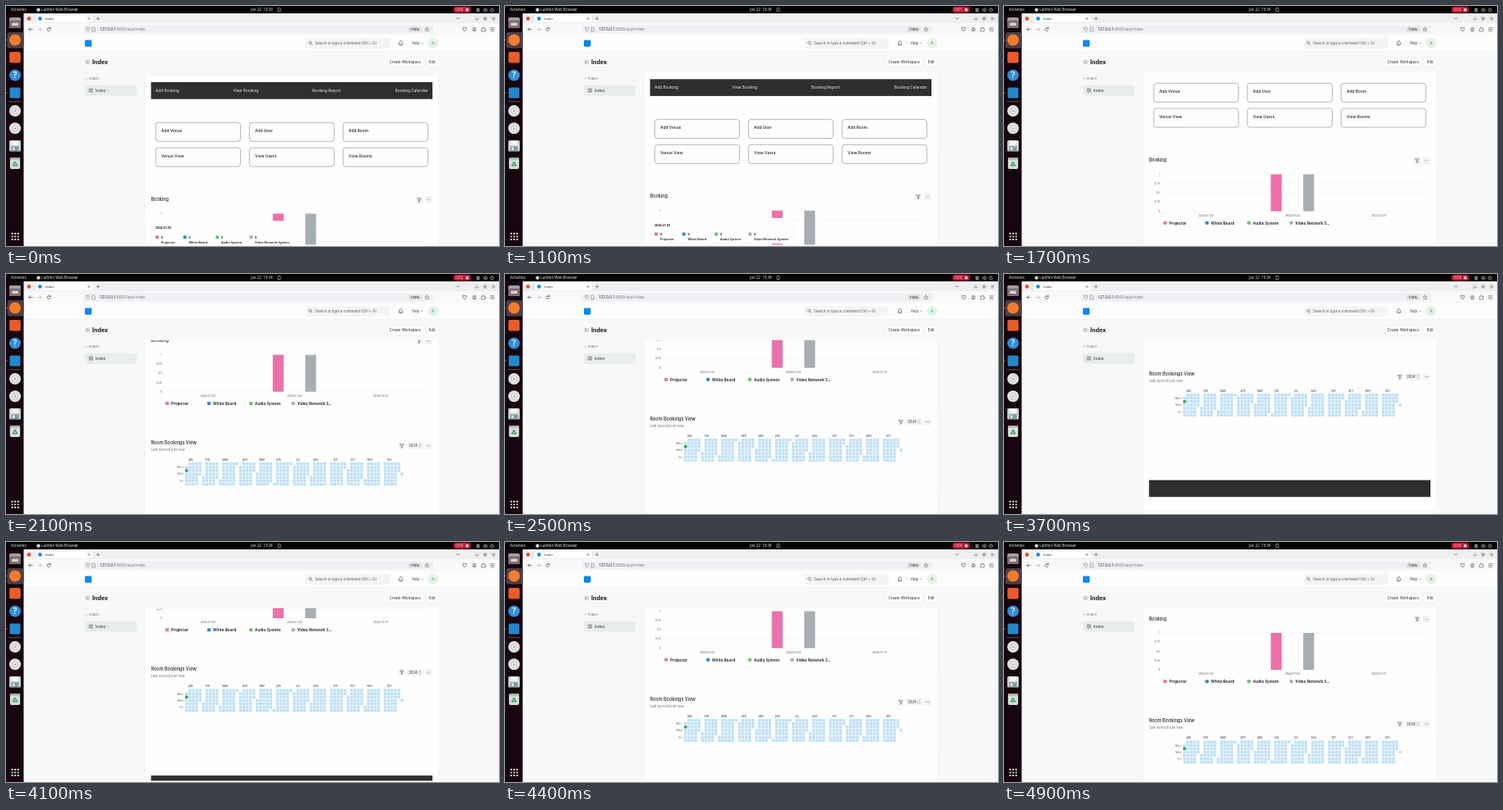
These frames come from a looping animation (600x293 px, 5000 ms). An HTML page:

```html
<!DOCTYPE html>
<html lang="en">
<head>
<meta charset="utf-8">
<title>Index</title>
<style>
html, body { margin: 0; width: 100%; height: 100%; overflow: hidden; background: #f7f9f8; }
svg { display: block; width: 100vw; height: 100vh; }
text { font-family: Inter, sans-serif; white-space: pre; }
.ui { font-family: "Open Sans", "Noto Sans", sans-serif; }
</style>
</head>
<body>
<svg id="stage" viewBox="0 0 600 293" preserveAspectRatio="none"></svg>
<script>
const LOOP = 5000;
const PINK = '#ec70aa', BLUE = '#318ad8', GREEN = '#5fc779', GREY = '#a5afb1';

// [time, scroll offset]; each value holds until the next
const SCROLL = [
  [0, 0], [800, 0.5], [1000, 2], [1100, 3.7], [1300, 9], [1500, 22],
  [1700, 48], [1800, 74], [1900, 102], [2000, 131], [2100, 154.8], [2200, 160],
  [2500, 184], [2600, 203], [2700, 218.5], [2800, 232], [2900, 239],
  [3800, 235], [3900, 228], [4000, 217], [4100, 205.5], [4200, 194],
  [4300, 181], [4400, 169], [4500, 159], [4700, 152], [4800, 146], [4900, 142.5]
];

const rect = (x, y, w, h, fill, r = 0, extra = '') =>
  `<rect x="${x}" y="${y}" width="${w}" height="${h}" rx="${r}" fill="${fill}" ${extra}/>`;
const circle = (x, y, r, fill, extra = '') =>
  `<circle cx="${x}" cy="${y}" r="${r}" fill="${fill}" ${extra}/>`;
const line = (d, color, w = 0.6) =>
  `<path d="${d}" fill="none" stroke="${color}" stroke-width="${w}" stroke-linecap="round" stroke-linejoin="round"/>`;
const text = (x, y, s, size, fill = '#222', extra = '') =>
  `<text x="${x}" y="${y}" font-size="${size}" fill="${fill}" ${extra}>${s}</text>`;
const border = (color, w = 0.5) => `stroke="${color}" stroke-width="${w}"`;
const UI = 'class="ui"', SEMI = 'class="ui" font-weight="600"', BOLD = 'class="ui" font-weight="700"';
const MID = 'text-anchor="middle"', END = 'text-anchor="end"';

function dots(x, y) {
  return [-1.5, 0, 1.5].map(d => circle(x + d, y, 0.45, '#444')).join('');
}

function toolButtons(x, y) {
  return rect(x, y - 4.3, 8.6, 8.6, '#f2f3f3', 2) +
    line(`M${x + 2.3} ${y - 1.8}h4l-1.5 2v2l-1 .5v-2.5z`, '#444', 0.55) +
    rect(510, y - 4.3, 8.6, 8.6, '#f2f3f3', 2) + dots(514.3, y);
}

function disc(y) {
  return circle(11, y, 7, '#e4e6e6') + circle(11, y, 5.2, '#d6d9d9') +
    circle(11, y, 2.2, '#f4f4f4') + circle(11, y, 0.9, '#777');
}

function dock() {
  let s = rect(0, 9, 21.5, 284, '#17050f') + rect(1.5, 32, 20, 19.5, '#4b4048', 3);
  s += rect(4, 14, 14, 13, '#a9a3a3', 2) + rect(4, 17.5, 14, 9.5, '#7e6f72', 1.5) +
    rect(7, 20.5, 8, 3.5, '#d8d2d2', 1);
  s += circle(11, 41.5, 7, '#f47b2a') + rect(4.2, 56, 13.6, 13.6, '#e95c29', 2);
  s += circle(11, 84.5, 7, '#2f8fd8') + text(11, 88.3, '?', 10.5, '#fff', `${SEMI} ${MID}`);
  s += rect(4.5, 99.5, 13, 13, '#2389ca', 1.5) + rect(3.5, 116.5, 15, 0.6, '#8d858a') + disc(128) + disc(149.3);
  s += rect(4, 164, 14, 13.5, '#c9cfd1', 1.5) + rect(6.5, 164.5, 9, 5.5, '#f2f4f4') +
    rect(6.5, 171.5, 9, 5.5, '#7d9aa8') + rect(8, 172.5, 2.5, 3.5, '#e8eaea');
  s += rect(4.8, 185, 12.4, 14, '#d8dedb', 2) + rect(4.8, 185, 12.4, 2.5, '#a9b3ae', 1) +
    line('M8.4 194.8l2.6-4.4 2.6 4.4z', '#45a764', 1.6);
  s += circle(0.8, 41.5, 0.8, '#e95420') + circle(0.8, 106, 0.8, '#e95420');
  for (let i = 0; i < 9; i++) s += rect(6.6 + i % 3 * 3.6, 276.8 + Math.floor(i / 3) * 3.6, 1.9, 1.9, '#f2f2f2', 0.5);
  return s;
}

function topBar() {
  return rect(0, 0, 600, 9, '#060405') +
    text(6, 6.2, 'Activities', 4.6, '#eee', UI) +
    circle(39.5, 4.6, 2.2, '#d8d8d8') +
    text(43.3, 6.2, 'Larkfen Web Browser', 4.5, '#eee', UI) +
    text(298, 6.2, '', 4.5, '#eee', `${UI} id="clock"`) +
    rect(331, 2.4, 3, 4.4, 'none', 0.7, border('#ddd', 0.6)) +
    rect(544.5, 0.7, 21.5, 7.6, '#c01530', 3.8) +
    text(547.3, 6.2, '', 4.5, '#fff', `${UI} id="rec"`) +
    rect(559.7, 3, 3.2, 3.2, '#fff', 0.4) +
    line('M574.7 2.7v4.2M573 6.9h3.4M573.2 3.5h3v1.8h-3z', '#ddd') +
    line('M581.4 4v1.7h1l1.4 1.4v-4.5l-1.4 1.4zM585.2 3.5q1 1.3 0 2.7', '#ddd') +
    line('M590 3.2a2.1 2.1 0 1 0 2.8 0M591.4 2.3v2.4', '#ddd');
}

function browser() {
  let s = rect(21.5, 9, 578.5, 12, '#efeff2') + rect(21.5, 21, 578.5, 14.3, '#f9f9fb');
  s += circle(28, 15.4, 2.3, '#e5512f') + line('M34 12.5v6', '#cfcfd4', 0.4);
  s += rect(36, 11, 70, 9.4, '#fff', 1.6, border('#dcdce0', 0.4));
  s += rect(39.3, 13.3, 4.2, 4.2, '#1686f0', 0.8) + text(48, 17, 'Index', 4, '#222', UI);
  s += line('M99.7 14.2l2.4 2.4m0-2.4l-2.4 2.4M110.3 15.4h3.4m-1.7-1.7v3.4', '#444', 0.55);
  s += line('M548.2 14.5l1.7 1.7 1.7-1.7', '#444');
  for (const x of [573, 583.2, 593.4]) s += circle(x, 15.4, 2.9, '#dedee1');
  s += line('M571.8 16.3h2.4M582.2 14.4h2v2h-2zM592.4 14.4l2 2m0-2l-2 2', '#444', 0.5);
  s += line('M32.2 28.5h-4.4m1.9-1.9l-1.9 1.9 1.9 1.9', '#333');
  s += line('M39 28.5h4.4m-1.9-1.9l1.9 1.9-1.9 1.9', '#aaa');
  s += line('M53.9 27.5a2 2 0 1 0 .1 1.8M54.1 25.9v1.7h-1.7', '#333');
  s += rect(94, 23.6, 426, 9.8, '#f0f0f4', 1.6);
  s += line('M97.8 26.8l1.9-.8 1.9.8q0 3-1.9 4.1-1.9-1.1-1.9-4.1z', '#666', 0.5);
  s += line('M105.4 26h2l1 1v4h-3z', '#666', 0.5);
  s += `<text x="114" y="30.2" font-size="4.7" class="ui" fill="#15141a">127.0.0.1<tspan fill="#77777d">:8000/app/index</tspan></text>`;
  s += rect(490, 25.2, 15.5, 6.6, '#dededf', 1.4) + text(497.7, 30, '110%', 4, '#222', `${SEMI} ${MID}`);
  s += line('M512.5 26l.8 1.6 1.7.2-1.2 1.2.3 1.8-1.6-.9-1.6.9.3-1.8-1.2-1.2 1.7-.2z', '#555', 0.5);
  s += line('M556.2 26.3q2 1.1 4 0v2q-.5 2.4-2 2.4t-2-2.4z', '#444');
  s += circle(570, 28.5, 2.2, 'none', border('#444', 0.55)) + circle(570, 27.8, 0.7, '#444') + line('M568.7 29.9h2.6', '#444');
  s += line('M579.2 27.2h1.2v-.9h1.2v.9h1.4v1.3h.7v1h-.7v1.4h-3.8z', '#444', 0.55);
  s += line('M589.8 26.7h4.4m-4.4 1.8h4.4m-4.4 1.8h4.4', '#444', 0.55);
  return s;
}

function pageHead() {
  let s = rect(21.5, 35.3, 578.5, 20, '#fdfdfd') + rect(21.5, 55.2, 578.5, 0.5, '#e8ecea');
  s += rect(96, 41.4, 8.3, 8.3, '#0f88f2', 1.4);
  s += rect(364.5, 39.2, 102.5, 12.2, '#f3f4f4', 2.6);
  s += circle(370.2, 44.8, 1.6, 'none', border('#444', 0.55)) + line('M371.4 46l1.2 1.2', '#444', 0.55);
  s += text(376, 46.8, 'Search or type a command (Ctrl + G)', 4.3, '#505456');
  s += line('M478.2 46.7q.7-.6.7-2.2 0-1.9 1.6-1.9t1.6 1.9q0 1.6.7 2.2zM479.8 48h1.4', '#333');
  s += line('M488.3 42v7', '#e2e4e4', 0.4) + text(494, 46.8, 'Help', 4.2, '#333');
  s += line('M505.2 44.8l1.1 1.1 1.1-1.1', '#555', 0.5);
  s += circle(519.8, 45.2, 6.2, '#e0f3e6') + text(519.8, 46.9, 'A', 4.6, '#48a368', MID);
  s += line('M97 66.8h4.2m-4.2 1.7h4.2m-4.2 1.7h4.2', '#666', 0.5);
  s += text(105, 70.9, 'Index', 7.1, '#171717', 'font-weight="700"');
  s += rect(463.3, 63.3, 45.7, 10.6, '#fff', 2.4, border('#e4e7e6')) + text(466.6, 70.2, 'Create Workspace', 4.4);
  s += rect(511, 63.3, 15.5, 10.6, '#fff', 2.4, border('#e4e7e6')) + text(514.7, 70.2, 'Edit', 4.4);
  s += line('M96.8 88.4l1 1 1-1', '#666', 0.5) + text(101, 90.3, 'PUBLIC', 3.5, '#60666a');
  s += rect(95.8, 96.7, 63.2, 12.7, '#e8ecea', 2.4);
  s += line('M101 101.2h4.6m-4.6 1.8h4.6m-4.6 1.8h4.6', '#444', 0.65) + text(109, 104.7, 'Index', 4.8, '#333');
  return s;
}

function chart() {
  let s = text(176.5, 238.1, 'Booking', 5.5, '#222', 'font-weight="500"') + toolButtons(498.6, 236.6);
  ['1', '0.75', '0.5', '0.25', '0'].forEach((v, i) => {
    const y = 253.5 + i * 11.25;
    s += rect(193, y - 0.2, 319, 0.4, '#e9ecec') + text(190, y + 1.2, v, 3.4, '#4a5055', `${UI} ${END}`);
  });
  s += rect(324.7, 253.5, 13.2, 45, PINK) + rect(364.2, 253.5, 13.2, 45, GREY);
  ['2024-01-02', '2024-01-02', '2024-01-01'].forEach((d, i) => {
    s += text(246 + i * 105.2, 304.7, d, 3.5, '#4a5055', `${UI} ${MID}`);
  });
  [[194, PINK, 'Projector'], [245, BLUE, 'White Board'], [296, GREEN, 'Audio System'], [347.5, GREY, 'Video Network S...']]
    .forEach(([x, c, name]) => {
      s += rect(x, 310.7, 4.1, 4.1, c, 0.8) + text(x + 7, 314.5, name, 4.6, '#303438', BOLD);
    });
  return s;
}

function tooltip() {
  let s = rect(176.5, 262.6, 174, 31, '#fefefe', 1.2, border('#eceeee', 0.4));
  s += text(182, 272.3, '2024-01-02', 3.7, '#222', BOLD);
  [[182, PINK, 'Projector'], [215.7, BLUE, 'White Board'], [255.2, GREEN, 'Audio System'], [296.3, GREY, 'Video Network System']]
    .forEach(([x, c, name]) => {
      s += rect(x, 280.2, 4, 4, c, 0.8) + text(x + 6.8, 283.7, '0', 3.7, '#222', BOLD) +
        text(x + 6.8, 289.6, name, 3.7, '#333', BOLD);
    });
  return s;
}

function heatmap() {
  const X = 218, Y = 384.9, STEP = 4.1;
  const cell = (c, r, fill) => rect((X + c * STEP).toFixed(1), (Y + r * STEP).toFixed(1), 3.5, 3.5, fill, 0.5);
  let s = text(176.5, 362.6, 'Room Bookings View', 5.5, '#222', 'font-weight="500"') +
    text(176.5, 370.5, 'Last synced just now', 4.15, '#6b7175') + toolButtons(477.4, 364.5);
  s += rect(488, 360.2, 20, 8.6, '#f2f3f3', 2) + text(490.3, 366, '2024', 4.2, '#333');
  s += line('M502.8 363.6l1-1 1 1m-2 1.8l1 1 1-1', '#555', 0.45);
  ['Mon', 'Wed', 'Fri'].forEach((d, i) => {
    s += text(215.5, Y + STEP * (2 * i + 1) + 3.1, d, 3.4, '#4a5055', `${UI} ${END}`);
  });
  let col = 0;
  for (let m = 0; m < 12; m++) {
    const first = new Date(2024, m, 1);
    const name = first.toLocaleString('en-US', { month: 'short' }).toUpperCase();
    const start = first.getDay(), days = new Date(2024, m + 1, 0).getDate();
    s += text((X + (col + 1) * STEP).toFixed(1), 382.9, name, 3.1, '#555b60', SEMI);
    for (let d = 0; d < days; d++) {
      const n = start + d;
      s += cell(col + Math.floor(n / 7), n % 7, m === 0 && d === 1 ? '#399e4f' : '#bfe0f6');
    }
    // a month that ends on Saturday is followed by an empty column
    col += Math.floor((start + days) / 7) + 1;
  }
  return s + cell(col, 3, '#bfe0f6');
}

function panel() {
  let s = rect(169, 84, 357.5, 444, '#fefefe', 2.5, border('#e6eae8'));
  s += rect(176.5, 93, 342.5, 20.6, '#2f2f2f');
  [[182, 'Add Booking'], [276.5, 'View Booking'], [372.7, 'Booking Report']].forEach(([x, t]) => {
    s += text(x, 105, t, 4.75, '#ececec');
  });
  s += text(513.5, 105, 'Booking Calendar', 4.75, '#ececec', END);
  ['Add Venue', 'Add User', 'Add Room', 'Venue View', 'View Users', 'View Rooms'].forEach((t, i) => {
    const x = 182.2 + i % 3 * 114, y = i < 3 ? 142.3 : 173;
    s += rect(x, y, 103.2, 23, '#fefefe', 3.2, border('#858585', 0.6)) +
      text(x + 6.9, y + 11.8, t, 4.85, '#222', 'font-weight="500"');
  });
  return s + chart() + `<g id="tip">${tooltip()}</g>` + heatmap() + rect(176.5, 490.6, 342.5, 20.6, '#2f2f2f');
}

const stage = document.getElementById('stage');
stage.innerHTML = '<clipPath id="view"><rect x="21.5" y="80.7" width="578.5" height="210.8"/></clipPath>' +
  rect(0, 0, 600, 293, '#f7f9f8') + rect(169, 290, 357.5, 3, '#fbfcfb') +
  `<g clip-path="url(#view)"><g id="page">${panel()}</g>` +
  rect(530.2, 84, 1, 93, '#f0f2f1', 0.5, 'id="thumb"') + '</g>' +
  pageHead() + browser() + dock() + topBar();

const [page, thumb, tip, clock, rec] =
  ['page', 'thumb', 'tip', 'clock', 'rec'].map(id => document.getElementById(id));

function draw(t) {
  const y = SCROLL.findLast(k => k[0] <= t)[1];
  page.setAttribute('transform', `translate(0 ${-y})`);
  thumb.setAttribute('y', 84 + y * 0.47);
  tip.setAttribute('visibility', t < 1700 ? 'visible' : 'hidden');
  clock.textContent = 'Jan 22  15:' + (t < 500 ? 33 : 34);
  rec.textContent = '0:0' + Math.floor((t + 300) / 1000);
}

const begin = performance.now();
function tick() {
  draw((performance.now() - begin) % LOOP);
  requestAnimationFrame(tick);
}
tick();
</script>
</body>
</html>
```
